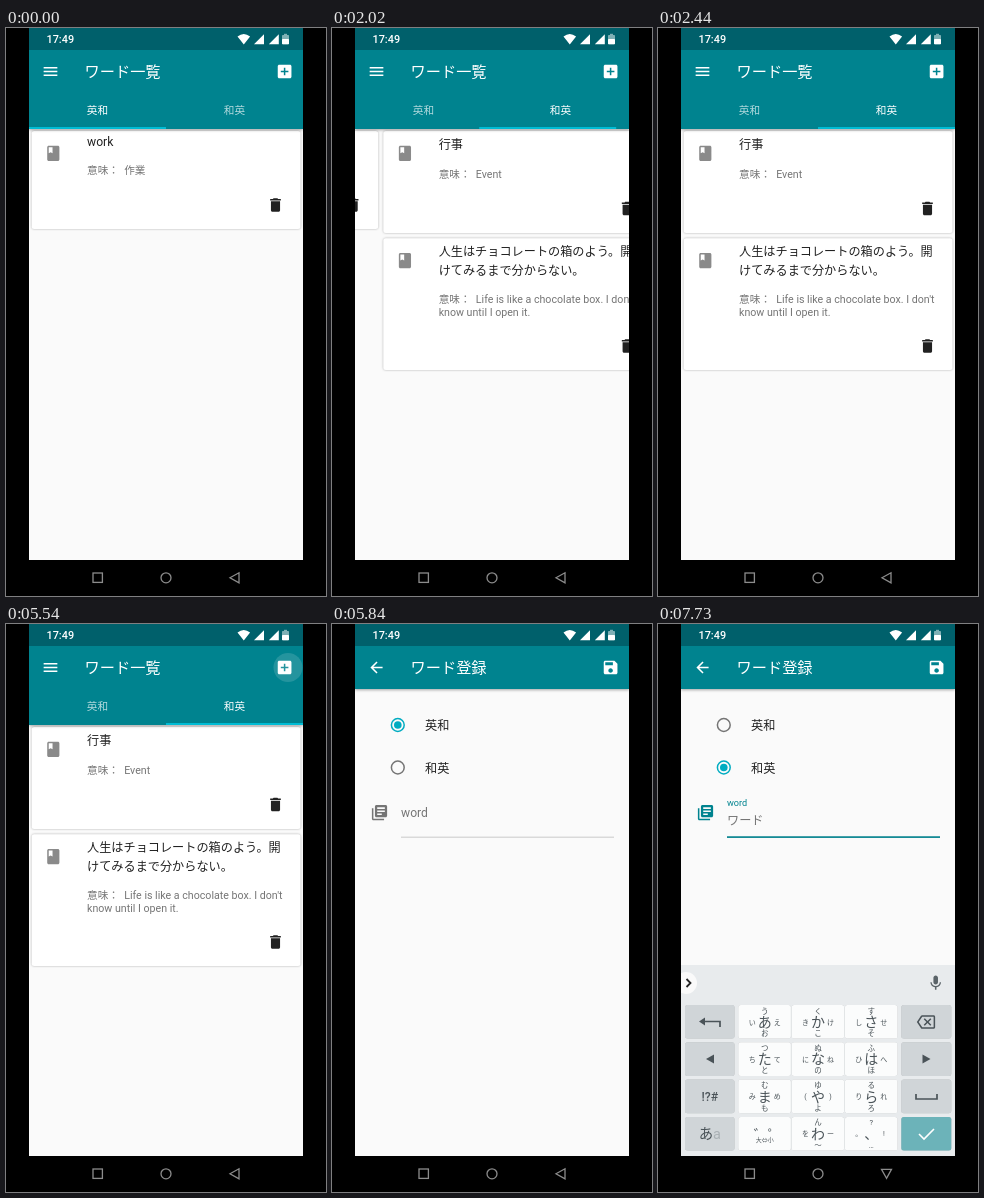
An HTML page for the animation above (8 s loop, 320 by 568 pixels).

```html
<!DOCTYPE html>
<html lang="ja">
<head>
<meta charset="utf-8">
<style>
html, body { margin: 0; width: 100%; height: 100%; overflow: hidden; background: #000; }
svg { display: block; }
text { font-family: Roboto, "Noto Sans CJK JP", "Noto Sans CJK", sans-serif; white-space: pre; }
.bar { filter: drop-shadow(0 1px 1.5px rgba(0,0,0,.35)); }
.card { fill: #fff; filter: drop-shadow(0 .8px .8px rgba(0,0,0,.3)); }
.key { filter: drop-shadow(0 .7px .3px rgba(0,0,0,.22)); }
</style>
</head>
<body>
<svg id="stage" width="320" height="568" viewBox="0 0 320 568"></svg>
<script>
const TEAL = '#00838f', ACCENT = '#00acc1', GREY = '#757575', INK = '#212121', KEY = '#4a5358';
const UNIT = 0.761; // screen pixels per dp

const ICONS = {
  menu: 'M3 18h18v-2H3v2zm0-5h18v-2H3v2zm0-7v2h18V6H3z',
  add: 'M19 3H5c-1.1 0-2 .9-2 2v14c0 1.1.9 2 2 2h14c1.1 0 2-.9 2-2V5c0-1.1-.9-2-2-2zm-2 10h-4v4h-2v-4H7v-2h4V7h2v4h4v2z',
  back: 'M20 11H7.83l5.59-5.59L12 4l-8 8 8 8 1.41-1.41L7.83 13H20v-2z',
  save: 'M17 3H5c-1.1 0-2 .9-2 2v14c0 1.1.9 2 2 2h14c1.1 0 2-.9 2-2V7l-4-4zm-5 16c-1.66 0-3-1.34-3-3s1.34-3 3-3 3 1.34 3 3-1.34 3-3 3zm3-10H5V5h10v4z',
  trash: 'M6 19c0 1.1.9 2 2 2h8c1.1 0 2-.9 2-2V7H6v12zM19 4h-3.5l-1-1h-5l-1 1H5v2h14V4z',
  book: 'M18 2H6c-1.1 0-2 .9-2 2v16c0 1.1.9 2 2 2h12c1.1 0 2-.9 2-2V4c0-1.1-.9-2-2-2zM6 4h5v8l-2.5-1.5L6 12V4z',
  library: 'M4 6H2v14c0 1.1.9 2 2 2h14v-2H4V6zm16-4H8c-1.1 0-2 .9-2 2v12c0 1.1.9 2 2 2h12c1.1 0 2-.9 2-2V4c0-1.1-.9-2-2-2zm-1 9H9V9h10v2zm-4 4H9v-2h6v2zm4-8H9V5h10v2z',
  mic: 'M12 14c1.66 0 3-1.34 3-3V5c0-1.66-1.34-3-3-3S9 3.34 9 5v6c0 1.66 1.34 3 3 3zm5.3-3c0 3-2.54 5.1-5.3 5.1S6.7 14 6.7 11H5c0 3.41 2.72 6.23 6 6.72V21h2v-3.28c3.28-.48 6-3.3 6-6.72h-1.7z',
  erase: 'M22 3H7c-.69 0-1.23.35-1.59.88L0 12l5.41 8.11c.36.53.9.89 1.59.89h15c1.1 0 2-.9 2-2V5c0-1.1-.9-2-2-2zm0 16H7.07L2.4 12l4.66-7H22v14zm-11.59-2L14 13.41 17.59 17 19 15.59 15.41 12 19 8.41 17.59 7 14 10.59 10.41 7 9 8.41 12.59 12 9 15.59z',
};

const icon = (name, x, y, fill, attrs = '') =>
  `<path d="${ICONS[name]}" fill="${fill}" transform="translate(${x} ${y}) scale(${UNIT}) translate(-12 -12)" ${attrs}/>`;
const text = (s, x, y, dp, fill, attrs = '') =>
  `<text x="${x}" y="${y}" font-size="${dp * UNIT}" fill="${fill}" ${attrs}>${s}</text>`;
const rect = (x, y, w, h, fill, attrs = '') =>
  `<rect x="${x}" y="${y}" width="${w}" height="${h}" fill="${fill}" ${attrs}/>`;
const line = (d, color, width, attrs = '') =>
  `<path d="${d}" fill="none" stroke="${color}" stroke-width="${width}" ${attrs}/>`;
const shape = (d, fill) => `<path d="${d}" fill="${fill}"/>`;
const MID = 'text-anchor="middle"';

function card(top, bottom, title, titleY, meaning, meaningY, trashY) {
  return rect(25.7, top, 268.8, bottom - top, '#fff', 'rx="2.5" class="card"')
    + icon('book', 47.3, top + 22.3, '#8a8a8a')
    + title.map((s, i) => text(s, 81, titleY + i * 18.3, 16, INK)).join('')
    + meaning.map((s, i) => text(s, 81, meaningY + i * 13, 14, GREY)).join('')
    + icon('trash', 269.5, trashY, INK);
}

function radio(id, y, label) {
  return `<circle id="ring${id}" cx="65.8" cy="${y}" r="6.4" fill="none" stroke-width="1.5"/>`
    + `<circle id="dot${id}" cx="65.8" cy="${y}" r="3.8"/>`
    + text(label, 93, y + 5, 16, INK);
}

function keyboard() {
  const rowY = r => 381 + r * 37.3;
  const box = (x, r, w, fill) => rect(x, rowY(r), w, 33.6, fill, 'rx="2.5" class="key"');
  const glyph = (s, x, y, size, attrs = '') =>
    s.trim() && text(s, x, y + size * .37, size / UNIT, KEY, MID + ' ' + attrs);
  // Each kana key reads: centre, left, top, right, bottom
  const kana = ['あいうえお', 'かきくけこ', 'さしすせそ', 'たちつてと', 'なにぬねの', 'はひふへほ',
    'まみむめも', 'や(ゆ)よ', 'らりるれろ', '', 'わをんー〜', '、。?!…'];
  let out = rect(23, 341, 274, 191, '#e8ebed')
    + '<circle cx="28" cy="359" r="11" fill="#fafafa"/>'
    + line('M28.5 355l4 4-4 4', '#222', 1.8)
    + icon('mic', 277.7, 359, '#5a6368');
  for (let r = 0; r < 4; r++) {
    out += box(27, r, 49.5, '#d0d5d8') + box(243.3, r, 50, r < 3 ? '#d0d5d8' : '#6cb3b9');
  }
  kana.forEach((set, i) => {
    const col = i % 3, r = i / 3 | 0, x = 106.7 + col * 53.3, y = rowY(r) + 17;
    out += box(80.3 + col * 53.3, r, 52.6, '#fbfcfc');
    if (!set) {
      out += glyph('゛゜', x + 3, y + 1, 14, 'font-weight="500"') + glyph('大⇔小', x, y + 6, 6);
      return;
    }
    const [c, left, top, right, bottom] = set;
    out += glyph(c, x, y, 14, 'font-weight="500"') + glyph(left, x - 12.5, y, 7)
      + glyph(top, x, y - 11.2, 7.5) + glyph(right, x + 12.5, y, 7) + glyph(bottom, x, y + 11.2, 7.5);
  });
  return out
    + line('M62 403v-5.5H43', KEY, 1.7) + shape('M41 397.5l6-4v8z', KEY)
    + shape('M48 435l8-4.5v9z', KEY)
    + text('!?#', 51.8, 476.5, 16, KEY, MID + ' font-weight="500"')
    + text('あ<tspan fill="#aab1b5">a</tspan>', 51.8, 515, 19, KEY, MID)
    + icon('erase', 268, 398, KEY)
    + shape('M272.5 435l-8-4.5v9z', KEY)
    + line('M258 470v5h21v-5', KEY, 1.7)
    + line('M261 510l5 5 10-10', '#fff', 1.6);
}

const statusBar = rect(23, 0, 274, 22, '#00606b')
  + text('17:49', 40.5, 15.3, 14.3, '#fff', 'font-weight="500"')
  + shape('M231.5 8.6q6.3-5 12.6 0l-6.3 7.8zM248 16.2h10V6.2zM262.8 16.2h10V6.2z', '#fff')
  + rect(276, 7, 7, 9.3, '#7fb0b5', 'rx=".8"') + rect(278, 5.8, 3, 1.5, '#7fb0b5')
  + rect(276, 11, 7, 5.3, '#fff', 'rx=".8"');

const title = s => text(s, 78.5, 49, 20, '#fff');

document.getElementById('stage').innerHTML = `
<svg x="23" width="274" height="532" viewBox="23 0 274 532">
  ${rect(23, 0, 274, 532, '#fafafa')}
  <g id="list">
    <g id="pages">
      ${card(103, 201, ['work'], 118.3, ['意味：\u00a0\u00a0作業'], 146, 177)}
      <g transform="translate(274)">
        ${card(103, 205, ['行事'], 121.3, ['意味：\u00a0\u00a0Event'], 150, 180.5)}
        ${card(210.3, 342, ['人生はチョコレートの箱のよう。開', 'けてみるまで分からない。'], 228.3,
          ['意味：\u00a0\u00a0Life is like a chocolate box. I don\'t', 'know until I open it.'], 275.3, 318)}
      </g>
    </g>
    ${rect(23, 20, 274, 81, TEAL, 'class="bar"')}
    ${icon('menu', 44.5, 43.5, '#fff')}${title('ワード一覧')}
    <circle id="ripple" cx="282" cy="43.5" fill="#fff"/>
    ${icon('add', 278.6, 43.5, '#fff')}
    ${text('英和', 91.5, 86.3, 14, '#fff', MID + ' id="tab0"')}
    ${text('和英', 228.5, 86.3, 14, '#fff', MID + ' id="tab1"')}
    ${rect(23, 99, 137, 2, '#00bcd4', 'id="marker"')}
  </g>
  <g id="form">
    ${rect(23, 0, 274, 600, '#fafafa')}
    ${rect(23, 20, 274, 45, TEAL, 'class="bar"')}
    ${icon('back', 44.5, 43.5, '#fff')}${title('ワード登録')}${icon('save', 278.6, 43.5, '#fff')}
    ${radio(0, 101, '英和')}${radio(1, 143.5, '和英')}
    ${icon('library', 47.5, 188.7, GREY, 'id="fieldIcon"')}
    ${text('word', 69, 193, 16, GREY, 'id="label"')}
    ${text('ワード', 69, 200.5, 16, GREY, 'id="hint"')}
    ${rect(69, 212.7, 213, .9, '#c4c4c4')}
    ${rect(69, 212.3, 213, 1.6, TEAL, 'id="underline"')}
  </g>
  <g id="keys">${keyboard()}</g>
  ${statusBar}
</svg>
${rect(87, 545, 9.4, 9.4, 'none', 'stroke="#8c8c8c" stroke-width="1.3"')}
<circle cx="160" cy="549.8" r="5" fill="none" stroke="#8c8c8c" stroke-width="1.3"/>
${line('M224 549.8l9-5v10z', '#8c8c8c', 1.3, 'id="navBack"')}`;

const set = (id, attrs) => {
  const el = document.getElementById(id);
  for (const name in attrs) el.setAttribute(name, attrs[name]);
};
const clamp = v => Math.max(0, Math.min(1, v));
// Progress from start to end, advancing in 60 ms steps
const stepped = (t, start, end) => clamp(Math.floor((t - start) / 60) * 60 / (end - start));
const mix = (a, b, u) => a + (b - a) * u;
const tint = u => `rgb(${mix(117, 0, u)},${mix(117, 172, u)},${mix(117, 193, u)})`;

function draw(t) {
  const shift = t < 1780 ? 0 : 274 - 196 * (1 - stepped(t, 1780, 2440)) ** 4.5;
  set('pages', { transform: `translate(${-shift})` });
  set('marker', { x: 23 + shift / 2 });
  set('tab0', { opacity: shift < 137 ? 1 : .7 });
  set('tab1', { opacity: shift < 137 ? .7 : 1 });

  set('ripple', { r: 14.5 + 5 * stepped(t, 5540, 5660), opacity: t < 5540 ? 0 : .14 });
  const open = stepped(t, 5600, 5840);
  set('form', { opacity: open, transform: `translate(0 ${40 * (1 - open) ** 2})` });

  const picked = t >= 7120, swap = picked ? stepped(t, 7060, 7300) : 0;
  set('ring0', { stroke: tint(1 - swap) });
  set('ring1', { stroke: tint(swap) });
  set('dot0', { fill: ACCENT, opacity: picked ? 0 : 1 });
  set('dot1', { fill: tint(swap), opacity: picked ? 1 : 0 });

  const focus = t < 7540 ? 0 : t >= 7730 ? 1 : stepped(t, 7480, 7720);
  const rise = 1 - (1 - focus) ** 2;
  const active = focus > 0 ? TEAL : GREY;
  set('fieldIcon', { fill: active });
  set('label', { fill: active, y: mix(193, 182, rise), 'font-size': mix(16, 12, rise) * UNIT });
  set('hint', { opacity: focus });
  set('underline', { x: mix(175.5, 69, rise), width: 213 * rise });
  set('keys', { transform: `translate(0 ${191 * (1 - rise)})`, opacity: focus > 0 ? 1 : 0 });
  set('navBack', { transform: `rotate(${-90 * rise} 228.5 549.8)` });
}

function tick() {
  draw(performance.now() % 8000);
  requestAnimationFrame(tick);
}
tick();
</script>
</body>
</html>
```
